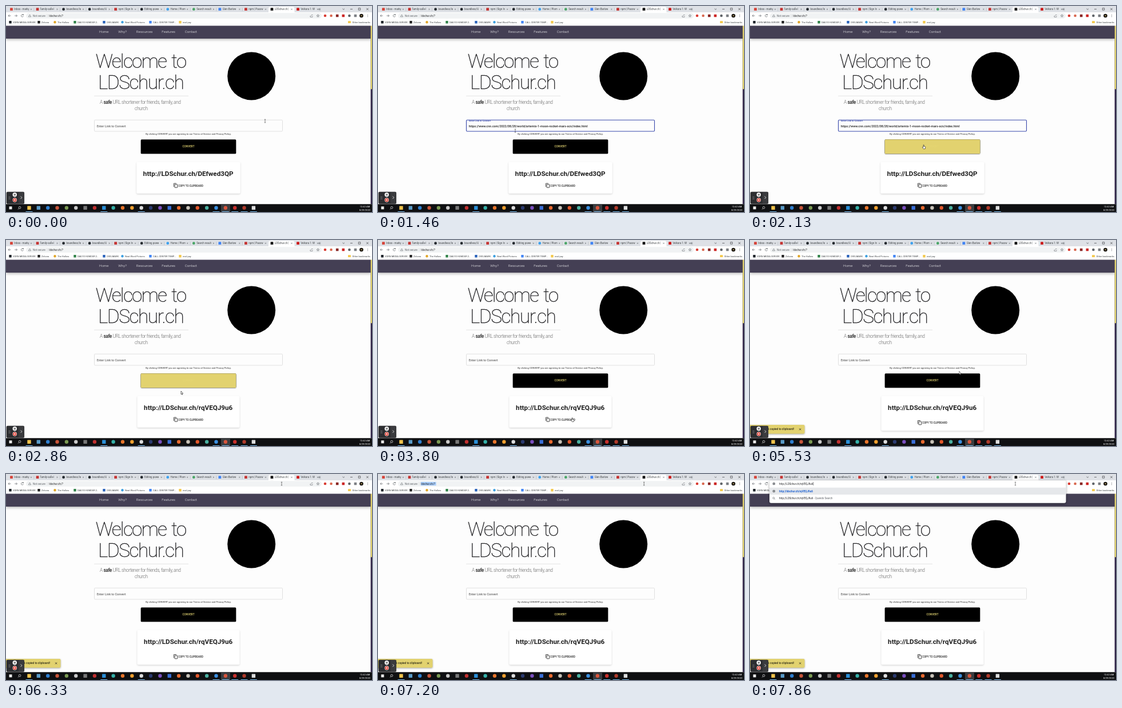
Recreate the animation shown at these times as an HTML page with a canvas. Size 640 by 360 pixels, loop 8 s.

```html
<!DOCTYPE html>
<html lang="en">
<head>
<meta charset="utf-8">
<title>URL shortener demo</title>
<style>
html, body { margin: 0; width: 100%; height: 100%; overflow: hidden; background: #fff; }
canvas { display: block; width: 100vw; height: 100vh; }
</style>
</head>
<body>
<canvas id="stage"></canvas>
<script>
const W = 640, H = 360, LOOP = 8000;
const canvas = document.getElementById('stage');
const ctx = canvas.getContext('2d');
const GOLD = '#e2d26f', INK = '#202124', GREY = '#5f6368', BLUE = '#3949ab';
const OLD_URL = 'http://LDSchur.ch/DEfwed3QP';
const NEW_URL = 'http://LDSchur.ch/rqVEQJ9u6';
const LINK = 'https://www.cnn.com/2022/08/28/world/artemis-1-moon-rocket-mars-scn/index.html';

// Moments at which the page changes state
const T = { focus: 850, paste: 1200, hover: 1900, convert: 2350, result: 2560, leave: 2870,
            copy: 3980, select: 6650, type: 7250 };

// Pointer path: time, x, y
const PATH = [
  [0, 453, 201], [150, 453, 201], [780, 250, 211], [1100, 244, 213], [1460, 240, 218],
  [1560, 240, 218], [2100, 304, 246], [2500, 306, 248], [2860, 307, 267], [3450, 338, 313],
  [3800, 340, 314], [4150, 340, 314], [4660, 328, 306], [5250, 328, 306], [6100, 480, 18],
  [6330, 482, 17], [6700, 480, 17], [7300, 464, 17], [8000, 464, 17]
];

const clamp = v => Math.max(0, Math.min(1, v));
const ease = v => { v = clamp(v); return v * v * (3 - 2 * v); };

function pointerAt(t) {
  const i = Math.max(1, PATH.findIndex(p => p[0] > t));
  const [t0, x0, y0] = PATH[i - 1], [t1, x1, y1] = PATH[i];
  const k = ease((t - t0) / (t1 - t0));
  return [x0 + (x1 - x0) * k, y0 + (y1 - y0) * k];
}

function rect(x, y, w, h, fill, r = 0) {
  ctx.fillStyle = fill;
  ctx.beginPath();
  ctx.roundRect(x, y, w, h, r);
  ctx.fill();
}

function disc(x, y, r, fill) {
  ctx.fillStyle = fill;
  ctx.beginPath();
  ctx.arc(x, y, r, 0, Math.PI * 2);
  ctx.fill();
}

function ring(x, y, r, color, width = 0.6, from = 0, to = Math.PI * 2) {
  ctx.strokeStyle = color;
  ctx.lineWidth = width;
  ctx.beginPath();
  ctx.arc(x, y, r, from, to);
  ctx.stroke();
}

function line(color, width, ...pts) {
  ctx.strokeStyle = color;
  ctx.lineWidth = width;
  ctx.beginPath();
  for (let i = 0; i < pts.length; i += 2) ctx.lineTo(pts[i], pts[i + 1]);
  ctx.stroke();
}

function text(s, x, y, size, color, { weight = 400, align = 'left', gap = 0, space = 0, edge = 0 } = {}) {
  ctx.font = `${weight} ${size}px Roboto, sans-serif`;
  ctx.letterSpacing = gap + 'px';
  ctx.wordSpacing = space + 'px';
  ctx.textAlign = align;
  ctx.fillStyle = color;
  ctx.fillText(s, x, y);
  if (edge) {
    ctx.strokeStyle = color;
    ctx.lineWidth = edge;
    ctx.strokeText(s, x, y);
  }
  return ctx.measureText(s).width;
}

function shadow(color, blur, dy, draw) {
  ctx.save();
  ctx.shadowColor = color;
  ctx.shadowBlur = blur * canvas.width / W;
  ctx.shadowOffsetY = dy * canvas.width / W;
  draw();
  ctx.restore();
}

function clipped(x, y, w, h, draw) {
  ctx.save();
  ctx.beginPath();
  ctx.rect(x, y, w, h);
  ctx.clip();
  draw();
  ctx.restore();
}

function cross(x, y, r, color, width = 0.6) {
  line(color, width, x - r, y - r, x + r, y + r);
  line(color, width, x + r, y - r, x - r, y + r);
}

function badge(x, y, r, color, round) {
  if (round) disc(x, y, r, color);
  else rect(x - r, y - r, 2 * r, 2 * r, color, 0.4);
}

const TABS = [
  ['Inbox - marky', '#d6453a'], ['family-safe-l', '#c53635'], ['boundless/lo', '#24292e', 1],
  ['boundless/U', '#24292e', 1], ['npm | Sign In', '#c53635'], ['Editing powe', '#24292e', 1],
  ['Home / Plomter', '#3da1ee', 1], ['Search result', '#49a566', 1], ['Glen Barlow', '#4285f4'],
  ['npm | Passw', '#c53635'], ['LDSchur.ch |', '#111'], ['Velkora 1: W', '#cc1d1d']
];

function tabBar() {
  rect(0, 0, W, 11.5, '#dee1e6');
  rect(459, 1.5, 45.5, 10, '#fff', [3, 3, 0, 0]);
  TABS.forEach(([label, color, round], i) => {
    const x = 6 + i * 45.55;
    badge(x + 3.5, 5.7, 2.4, color, round);
    clipped(x + 8, 0, 26.5, 11, () => text(label, x + 8.3, 7.3, 4.45, '#3c4043'));
    cross(x + 38, 5.7, 1.2, GREY);
    if (i < 9 || i === 11) line('#a5a9af', 0.5, x + 42.8, 3, x + 42.8, 9);
  });
  line(GREY, 0.7, 546, 5.7, 550, 5.7);
  line(GREY, 0.7, 548, 3.7, 548, 7.7);
  line(INK, 0.6, 588.5, 4.7, 590.3, 6.3, 592, 4.7);
  line(INK, 0.6, 602, 5.5, 606, 5.5);
  ctx.strokeRect(616.3, 3.7, 3.4, 3.4);
  cross(632, 5.5, 1.8, INK, 0.6);
}

const MARKS = [
  [4, 'VORN MEDIA SERVER', '#1d2228'], [54, 'Zelvora', '#222'], [82, 'The Hollow', '#e0a528'],
  [117, 'DAILYS HUMOUR 2..', '#32834a'], [168, 'OVELMARK', '#2962ba'],
  [200, 'Neat Word Pictures', '#3c9fdf'], [249, 'CALL CENTER TEMP...', '#4285f4'],
  [301, 'oval pay', '#f3c94e']
];

function toolbar(t) {
  rect(0, 11, W, 23.5, '#fff');
  line(GREY, 0.7, 8.5, 17, 4, 17);
  line(GREY, 0.7, 6, 15, 4, 17, 6, 19);
  line(GREY, 0.7, 15, 17, 19.5, 17);
  line(GREY, 0.7, 17.5, 15, 19.5, 17, 17.5, 19);
  ring(28.5, 17, 2.1, GREY, 0.7, 0.3, 5.5);
  rect(29, 14.6, 1.8, 1.5, GREY);

  rect(35, 12.3, 517, 9.6, '#f1f3f4', 4.8);
  ctx.lineJoin = 'round';
  line(GREY, 0.6, 41.5, 15, 39.3, 18.8, 43.7, 18.8, 41.5, 15);
  text('Not secure', 47, 18.6, 4.5, GREY);
  line('#bdc1c6', 0.5, 72, 14.5, 72, 19.5);
  if (t >= T.select) rect(74.8, 13.8, 26.8, 6.4, '#a8cdfb');
  text('ldschur.ch/?', 75.3, 18.6, 4.5, INK);

  line(GREY, 0.6, 532, 17, 532, 19.3, 536, 19.3, 536, 17.5);
  line(GREY, 0.6, 533, 17.5, 534.5, 15.5, 536.5, 15.5);
  ctx.beginPath();
  for (let i = 0; i <= 10; i++) {
    const a = -Math.PI / 2 + i * Math.PI / 5, r = i % 2 ? 1.1 : 2.5;
    ctx.lineTo(545.5 + r * Math.cos(a), 17.2 + r * Math.sin(a));
  }
  ctx.stroke();
  [['#d93b32', 1], ['#d9684f', 1], ['#8a2725'], ['#cc2423'], ['#5f6368', 1], ['#7c7f84']]
    .forEach(([c, round], i) => badge(558 + i * 10.6, 17, 2.3, c, round));
  disc(621.5, 17, 3.3, '#15120d');
  disc(621.5, 17, 1.2, '#ac955c');
  for (let i = -1; i < 2; i++) disc(632.5, 17 + i * 1.7, 0.5, GREY);

  MARKS.forEach(([x, label, color], i) => {
    badge(x + 3.5, 28.2, 2.2, color, i % 3 === 2);
    text(label, x + 8, 29.8, 4.05, '#3c4043');
  });
  rect(598, 26.3, 5, 3.8, '#f3c94e', 0.5);
  text('Other bookmarks', 605.5, 29.8, 4.1, '#3c4043');
}

function header() {
  shadow('rgba(0,0,0,.32)', 5, 1.5, () => rect(0, 34, 638, 23, '#443f54'));
  [['Home', 163], ['Why?', 196.3], ['Resources', 227.8], ['Features', 272.3], ['Contact', 312.7]]
    .forEach(([s, x]) => text(s, x, 47.2, 6.2, '#fff', { weight: 300 }));
  rect(637.7, 34, 2.3, 312.3, '#2d2146');
  rect(637.7, 34, 2.3, 111.3, GOLD);
}

function hero() {
  const title = { weight: 200, align: 'center', gap: -1.8, space: 3, edge: 0.35 };
  text('Welcome to', 235.5, 108, 33.5, '#1c1c1f', title);
  text('LDSchur.ch', 235.7, 145.3, 33.5, '#1c1c1f', { ...title, gap: -1.5 });
  line('#d2d2d2', 0.6, 154, 157.2, 319, 157.2);
  const thin = { weight: 300, gap: -0.43 };
  let x = 164;
  x += text('A ', x, 171.2, 8.4, '#666', thin);
  x += text('safe', x, 171.2, 8.4, '#222', { weight: 500, gap: -0.43 });
  text(' URL shortener for friends, family, and', x, 171.2, 8.4, '#666', thin);
  text('church', 236.3, 181.6, 8.4, '#666', { ...thin, align: 'center' });
  disc(429.2, 122.5, 42, '#000');
}

function form(t) {
  const focused = t >= T.focus && t < T.convert;
  const filled = t >= T.paste && t < T.result;
  ctx.strokeStyle = focused ? BLUE : '#cdcdcd';
  ctx.lineWidth = focused ? 1.1 : 0.6;
  ctx.beginPath();
  ctx.roundRect(154.5, 199.2, 329, 19.8, 1.5);
  ctx.stroke();

  const lift = ease((t - T.focus) / 150) * (1 - ease((t - T.result) / 150));
  clipped(155, 199, 328, 20, () => {
    text('Enter Link to Convert', 158.7, 211.7 - 9.7 * lift, 5.45 - 1.35 * lift,
         focused ? BLUE : '#666', { weight: 500 });
  });
  if (filled) text(LINK, 158.7, 211.9, 5.4, '#222', { weight: 500 });
  else if (focused && t % 1000 < 500) line(INK, 0.5, 159, 206, 159, 213);

  text('By clicking CONVERT you are agreeing to our Terms of Service and Privacy Policy.',
       319, 224.6, 4.15, '#222', { align: 'center' });

  const glow = ease((t - T.hover) / 200) * (1 - ease((t - T.leave) / 220));
  shadow(`rgba(0,0,0,${0.1 + 0.25 * glow})`, 2, 0.7, () => rect(235.7, 233.2, 166.6, 25, '#000', 1.5));
  ctx.globalAlpha = glow;
  rect(235.7, 233.2, 166.6, 25, GOLD, 1.5);
  ctx.globalAlpha = 1;
  text('CONVERT', 319, 246.8, 4.7, '#e5d673', { weight: 500, align: 'center' });
}

function card(t) {
  const done = t >= T.result, grow = 5.5 * ease((t - T.copy) / 120);
  const half = done ? 89.5 : 90.7;
  shadow('rgba(0,0,0,.16)', 3, 1.2, () =>
    rect(319 - half, 272.5, half * 2, 55.3 + grow, '#fff', 2));
  text(done ? NEW_URL : OLD_URL, 318.7, 297.2, 11.7, '#1f1f1f', { weight: 700, align: 'center' });
  const y = 310 + grow;
  line('#222', 0.8, 298, y, 293.5, y, 293.5, y + 6);
  ctx.strokeRect(295.2, y + 1.7, 4.3, 5.6);
  text('COPY TO CLIPBOARD', 301, y + 5.5, 4.5, '#222', { weight: 500 });
}

function snackbar(t) {
  const k = ease((t - T.copy - 60) / 150);
  if (!k) return;
  ctx.save();
  ctx.globalAlpha = k;
  shadow('rgba(0,0,0,.35)', 3, 1, () => rect(-4, 323, 99.5, 15.5, GOLD, 2));
  text('Link copied to clipboard!', 77, 332.2, 4.75, '#2b2816', { weight: 500, align: 'right' });
  cross(87.6, 330.8, 1.5, '#222', 0.8);
  ctx.restore();
}

function recorder() {
  shadow('rgba(0,0,0,.3)', 1.5, 0.3, () => rect(0.8, 324.8, 31.2, 21, '#2c2d30', 2));
  rect(21.8, 325.6, 9.6, 19.4, '#3a3b3e', 1.5);
  for (let i = 0; i < 6; i++) disc(5.2 + (i % 2) * 1.8, 333.2 + (i >> 1) * 2, 0.5, '#aaa');
  disc(15.3, 329.7, 3.7, '#fff');
  rect(13.9, 328, 0.9, 3.4, '#222');
  rect(15.8, 328, 0.9, 3.4, '#222');
  disc(15.3, 339, 3.7, '#fff');
  disc(15.3, 339, 3.1, '#df3e32');
  rect(14.2, 337.9, 2.2, 2.2, '#fff');
  line('#fff', 0.8, 25.7, 332.5, 27.7, 334.7, 25.7, 337);
}

const APPS = ('f0c24a 5a9bc8 2f7fd0 c8553a 7a9a52 c9c9c9 777777 c03030 2a8fd8 35b0a8 e8752b f0a030 ' +
  'dddddd 2b3a70 7a4fc0 3a6fd8 e86a30 c8c2b8 e2582c 4ab0a0 3a8fe0 d9553c c8302c b03a2a dddddd').split(' ');
const SQUARE = [0, 1, 6, 8, 15, 24];

function taskbar() {
  rect(0, 346.2, W, 13.8, '#0f1012');
  rect(376, 346.2, 16, 13.8, '#3b3d40');
  rect(5.5, 350.3, 5, 5, '#eee');
  ring(24, 352.3, 1.9, '#eee', 0.7);
  line('#eee', 0.7, 22.6, 353.7, 21, 355.5);
  APPS.forEach((c, i) => {
    const x = 40.5 + i * 16.35;
    badge(x, 352.8, 3.2, '#' + c, !SQUARE.includes(i));
    if (i === 0 || i === 8 || i === 12 || i > 19) rect(x - 6, 359, 12, 1, '#76b9ed');
  });
  text('12:42 AM', 627.5, 351.9, 4.1, '#fff', { align: 'center' });
  text('8/29/2022', 627.5, 358.2, 4.1, '#fff', { align: 'center' });
}

function globe(x, y) {
  disc(x, y, 2.3, GREY);
  line('#fff', 0.4, x - 2, y, x + 2, y);
  line('#fff', 0.4, x, y - 2, x, y + 2);
}

function suggestions(t) {
  if (t < T.type) return;
  shadow('rgba(0,0,0,.4)', 4, 1, () => rect(34, 11.3, 518.5, 39.5, '#fff', 3));
  globe(41.8, 17);
  const w = text(NEW_URL, 51, 18.7, 4.5, INK);
  if (t % 1000 > 500) line(INK, 0.5, 51.5 + w, 14, 51.5 + w, 20);
  rect(34, 23.7, 518.5, 12.3, '#e6e8eb');
  globe(41.8, 30);
  text(NEW_URL.replace('LDS', 'lds'), 51, 31.5, 4.6, '#1a5fd0', { weight: 700 });
  ring(41.3, 42, 1.5, GREY);
  line(GREY, 0.6, 42.4, 43.1, 44, 44.7);
  const x = 51 + text(NEW_URL, 51, 44.2, 4.5, INK);
  text(' - Quendo Search', x, 44.2, 4.5, GREY);
}

function pointer(t) {
  const [x, y] = pointerAt(t);
  const overText = y < 22 || (y > 198 && y < 220 && x > 154 && x < 484);
  const overLink = (y > 233 && y < 258 && x > 235 && x < 402) || (y > 308 && y < 322 && x > 291 && x < 347);
  if (overText) {
    line('#333', 0.6, x, y - 2.7, x, y + 2.7);
    line('#333', 0.6, x - 1.2, y - 2.8, x + 1.2, y - 2.8);
    line('#333', 0.6, x - 1.2, y + 2.8, x + 1.2, y + 2.8);
    return;
  }
  const shape = overLink
    ? [-0.9, -3.2, 0.1, -3.2, 0.3, -0.8, 2.5, -0.2, 2.8, 0.8, 2.2, 3.6, -0.8, 3.6, -2.7, 0.8, -1.9, 0.2, -0.9, 1]
    : [-1, -3, -1, 2.6, 0.2, 1.5, 1, 3.4, 1.8, 3, 1, 1.2, 2.7, 1.1];
  ctx.beginPath();
  for (let i = 0; i < shape.length; i += 2) ctx.lineTo(x + shape[i], y + shape[i + 1]);
  ctx.closePath();
  ctx.fillStyle = '#fff';
  ctx.fill();
  ctx.strokeStyle = '#111';
  ctx.lineWidth = 0.6;
  ctx.stroke();
}

function resize() {
  const ratio = window.devicePixelRatio || 1;
  canvas.width = Math.round(innerWidth * ratio);
  canvas.height = Math.round(innerHeight * ratio);
}

function draw(t) {
  ctx.setTransform(canvas.width / W, 0, 0, canvas.height / H, 0, 0);
  rect(0, 0, W, H, '#fdfdfd');
  hero();
  form(t);
  card(t);
  header();
  tabBar();
  toolbar(t);
  suggestions(t);
  snackbar(t);
  taskbar();
  recorder();
  pointer(t);
}

resize();
addEventListener('resize', resize);
const start = performance.now();
function tick() {
  draw((performance.now() - start) % LOOP);
  requestAnimationFrame(tick);
}
tick();
</script>
</body>
</html>
```
